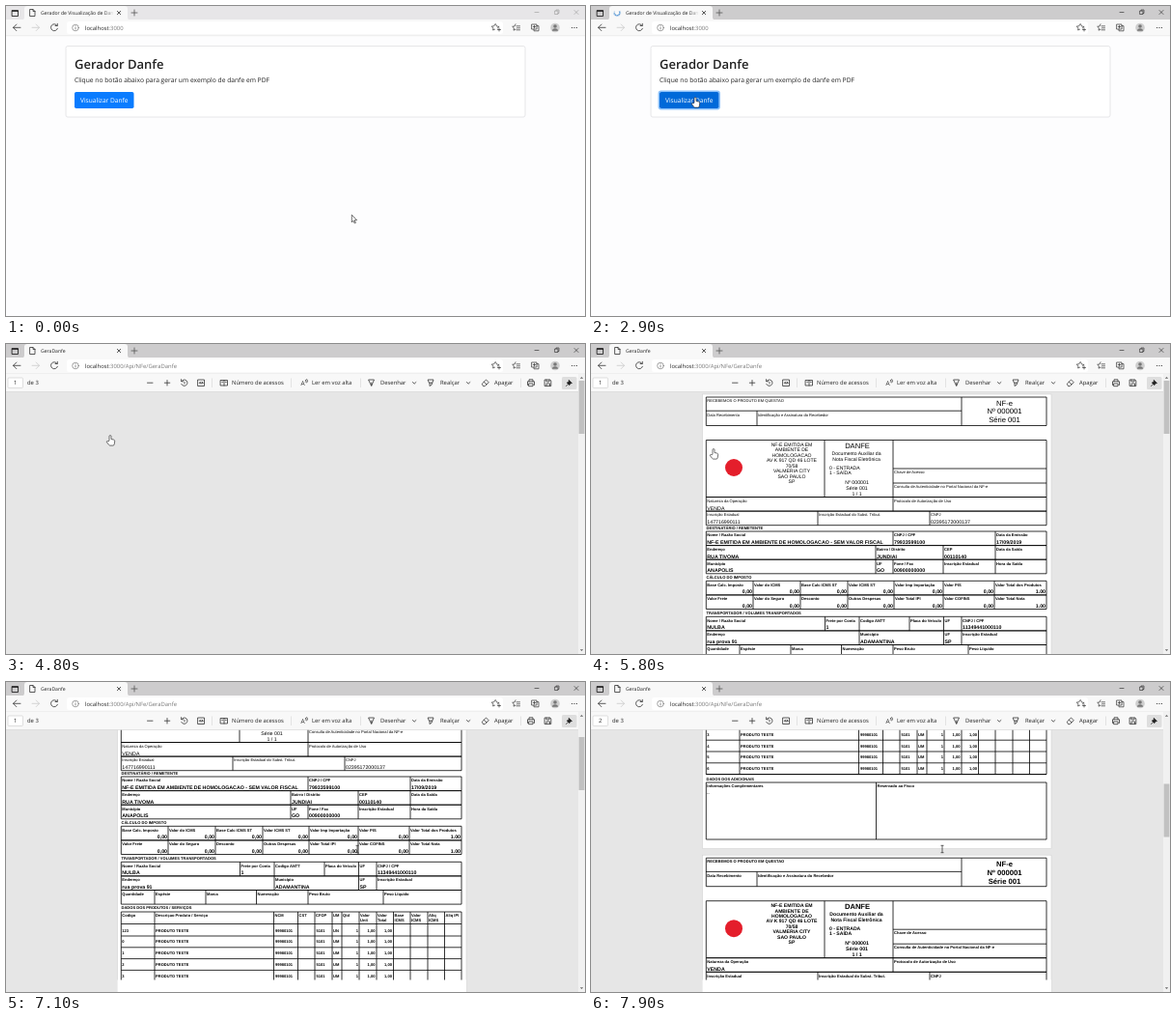
Write an HTML page that moves like this. It is 600x321 px and loops after 8 s.

```html
<!DOCTYPE html>
<html lang="pt-BR">
<head>
<meta charset="utf-8">
<title>Gerador de Danfe</title>
<style>
html, body { margin: 0; height: 100%; overflow: hidden; background: #fdfdfe; }
svg { display: block; width: 100vw; height: 100vh; text-rendering: geometricPrecision; }
.ui { font-family: "Open Sans", "Noto Sans", sans-serif; fill: #222; }
.doc { font-family: "Liberation Sans", Arial, sans-serif; fill: #000; }
.tab { font-size: 5.1px; }
.bar { font-size: 5.87px; }
.ico { fill: none; stroke: #333; stroke-width: .8; stroke-linecap: round; stroke-linejoin: round; }
.rule { fill: none; stroke: #000; stroke-width: .8; }
.mute { fill: #777; }

.a { animation: 8s step-end infinite; }
.frame { animation-name: frame; }
.winbtn { animation-name: winbtn; }
.page { animation-name: page; }
.viewer { animation-name: viewer; }
.loaded { animation-name: loaded; }
.sheets { animation-name: sheets; }
.title1 { animation-name: title1; }
.title2 { animation-name: title2; }
.path { animation-name: path; }
.fileicon { animation-name: fileicon; }
.spin { animation-name: spin; }
.wheel { animation: wheel 1s steps(10) infinite; transform-origin: 27px 7px; }
.button { animation-name: button; }
.ring { animation-name: ring; }
.pg1 { animation-name: pg1; }
.pg2 { animation-name: pg2; }
.edge { animation-name: edge; }
.scroll { animation-name: scroll; }
.thumb { animation-name: thumb; }
.cursor { animation-name: cursor; }
.arrow { animation-name: arrow; }
.hand { animation-name: hand; }
.beam { animation-name: beam; }

@keyframes frame { 0% { fill: #e7e6e8 } 32.5%, 100% { fill: #cdcccd } }
@keyframes winbtn { 0% { stroke: #999 } 32.5%, 100% { stroke: #222 } }
@keyframes page { 0% { visibility: visible } 56.25%, 100% { visibility: hidden } }
@keyframes viewer { 0% { visibility: hidden } 56.25%, 100% { visibility: visible } }
@keyframes loaded { 0% { visibility: hidden } 60%, 100% { visibility: visible } }
@keyframes sheets { 0% { visibility: hidden } 62.5%, 100% { visibility: visible } }
@keyframes title1 { 0% { visibility: visible } 43.75%, 100% { visibility: hidden } }
@keyframes title2 { 0% { visibility: hidden } 43.75% { visibility: visible } 60%, 100% { visibility: hidden } }
@keyframes path { 0% { visibility: hidden } 43.75%, 100% { visibility: visible } }
@keyframes fileicon { 0% { visibility: visible } 32.5% { visibility: hidden } 50%, 100% { visibility: visible } }
@keyframes spin { 0% { visibility: hidden } 32.5% { visibility: visible } 50%, 100% { visibility: hidden } }
@keyframes wheel { to { transform: rotate(360deg) } }
@keyframes button { 0% { fill: #0a7cff } 16.25% { fill: #0572ec } 17.5%, 100% { fill: #0069d9 } }
@keyframes ring { 0% { visibility: hidden } 32.5%, 100% { visibility: visible } }
@keyframes pg1 { 0% { visibility: hidden } 60% { visibility: visible } 97.5%, 100% { visibility: hidden } }
@keyframes pg2 { 0% { visibility: hidden } 97.5%, 100% { visibility: visible } }
@keyframes edge { 0% { visibility: hidden } 86.25%, 100% { visibility: visible } }
@keyframes scroll {
  0% { transform: translateY(0) }
  85% { transform: translateY(0); animation-timing-function: steps(3) }
  88.75% { transform: translateY(-96px); animation-timing-function: steps(4) }
  93.75% { transform: translateY(-256px); animation-timing-function: steps(4) }
  98.75%, 100% { transform: translateY(-346px) }
}
@keyframes thumb {
  0% { transform: translateY(0) }
  85% { transform: translateY(0); animation-timing-function: steps(3) }
  88.75% { transform: translateY(19px); animation-timing-function: steps(4) }
  93.75% { transform: translateY(50px); animation-timing-function: steps(4) }
  98.75%, 100% { transform: translateY(67.5px) }
}
@keyframes cursor {
  0% { transform: translate(358px, 216px); animation-timing-function: steps(4) }
  5% { transform: translate(151px, 93px) }
  6.25% { transform: translate(151px, 93px); animation-timing-function: steps(5) }
  12.5% { transform: translate(182px, 101px); animation-timing-function: steps(4) }
  17.5% { transform: translate(112px, 96px); animation-timing-function: steps(5) }
  23.75% { transform: translate(109px, 95px); animation-timing-function: steps(3) }
  27.5% { transform: translate(108px, 95px) }
  72.5% { transform: translate(127px, 109px); animation-timing-function: steps(3) }
  76.25% { transform: translate(300px, 63px); animation-timing-function: steps(2) }
  78.75% { transform: translate(458px, 190px); animation-timing-function: steps(2) }
  81.25% { transform: translate(400px, 311px) }
  82.5%, 100% { transform: translate(364px, 173px) }
}
@keyframes arrow { 0% { visibility: visible } 16.25%, 100% { visibility: hidden } }
@keyframes hand { 0% { visibility: hidden } 16.25% { visibility: visible } 73.75%, 100% { visibility: hidden } }
@keyframes beam { 0% { visibility: hidden } 73.75%, 100% { visibility: visible } }
</style>
</head>
<body>
<svg viewBox="0 0 600 321">
  <defs>
    <linearGradient id="fade"><stop stop-color="#f8f8f8" stop-opacity="0"/><stop offset="1" stop-color="#f8f8f8"/></linearGradient>
    <clipPath id="tabclip"><path d="M19 0H112V14H19z"/></clipPath>
  </defs>
  <rect width="600" height="321" fill="#fdfdfe"/>

  <g class="ui a page">
    <rect x="62" y="41.5" width="476" height="73.5" rx="2" fill="#fff" stroke="#e0e0e2" stroke-width=".8"/>
    <text x="71" y="65" font-size="13.04" font-weight="600">Gerador Danfe</text>
    <text x="71" y="79.3" font-size="6.71">Clique no botão abaixo para gerar um exemplo de danfe em PDF</text>
    <rect class="a ring" x="70.3" y="88.3" width="62.9" height="18.4" rx="2.4" fill="none" stroke="#8cc2fb" stroke-width="1.5"/>
    <rect class="a button" x="71" y="89" width="61.5" height="17" rx="1.8"/>
    <text x="77" y="100" font-size="6.61" fill="#fff">Visualizar Danfe</text>
  </g>

  <g class="a viewer">
    <rect y="31" width="600" height="290" fill="#e6e6e6"/>
    <g class="a sheets"><g class="doc a scroll" id="doc"></g></g>
    <rect class="a edge" x="115.5" y="308.5" width="361.5" height="13" fill="#fff"/>
  </g>

  <g class="ui">
    <rect class="a frame" width="600" height="14.5"/>
    <path d="M16 14.5q3 0 3-3V3q0-3 3-3H123q3 0 3 3V11.500q0 3 3 3z" fill="#f8f8f8"/>
    <rect y="14" width="600" height="17" fill="#f8f8f8"/>
    <path d="M0 30.800H600" stroke="#e2e2e2" stroke-width=".6"/>
    <rect x="63" y="16" width="452" height="13" rx="2.500" fill="#fff"/>
    <g class="ico">
      <path d="M6.500 4.500h6v6h-6zM6.500 5.500h6" stroke="#111"/>
      <path d="M7.500 22.300H15M10.800 19l-3.300 3.300 3.300 3.300"/>
      <path d="M27 22.300h7.500M31.200 19l3.300 3.300-3.300 3.300" stroke="#ccc"/>
      <path d="M53 20.300a3.500 3.500 0 1 0 .4 3M53.300 18.300v2.200h-2.200"/>
      <circle cx="72" cy="22.500" r="3.300" stroke="#666" stroke-width=".6"/>
      <path d="M72 22.300v1.700M72 20.800v.1" stroke="#666" stroke-width=".7"/>
      <path d="M115.300 5.300l3.400 3.400M118.700 5.300l-3.400 3.400"/>
      <path d="M130 7h6M133 4v6" stroke="#555"/>
      <path d="M507.500 18.800l1.100 2.300 2.500.3-1.900 1.700M506.500 24.200l-1.900.8.400-2.200-1.800-1.700 2.500-.3 1.100-2M509.500 24.500h3M511 23v3" stroke-width=".7"/>
      <path d="M528 18.800l-1 2.200-2.300.3 1.700 1.600-.4 2.300 2-1.100M529 20.800h3.500M529.500 22.800h3M529 24.800h3.500" stroke-width=".7"/>
      <path d="M545 19h5v5h-5zM547 24v1.800h5v-5.200h-2M547.500 20.200v2.600M546.200 21.500h2.600" stroke-width=".7"/>
      <g class="a winbtn" stroke-width=".6"><path d="M548 6.500h4M569 5h3v3.500h-3zM570 5V4h3v3.500h-1M589 4.500l4 4M593 4.500l-4 4"/></g>
    </g>
    <circle cx="569" cy="22.500" r="4.800" fill="#cfcfcf"/>
    <circle cx="569" cy="21" r="1.800" fill="#777"/><path d="M566 25.800q0-2.500 3-2.500t3 2.500z" fill="#777"/>
    <path d="M586.600 22.500h.01M589 22.500h.01M591.400 22.500h.01" stroke="#222" stroke-width="1.200" stroke-linecap="round"/>
    <path class="ico a fileicon" d="M25 3.500h3l2 2v5h-5zM28 3.500v2h2" stroke-width=".7"/>
    <g class="a spin"><circle class="wheel" cx="27" cy="7" r="3" fill="none" stroke="#1a73c8" stroke-width=".9" stroke-dasharray="12 7"/></g>
    <g class="tab" clip-path="url(#tabclip)">
      <text class="a title1" x="36" y="8.900">Gerador de Visualização de Danfe</text>
      <text class="a title2" x="36" y="8.900">localhost:3000/Api/NFe/GeraDanfe</text>
      <text class="a loaded" x="36" y="8.900">GeraDanfe</text>
      <rect x="102" y="2" width="10" height="10" fill="url(#fade)"/>
    </g>
    <text class="bar" x="82" y="24.500">localhost<tspan class="mute">:3000</tspan><tspan class="mute a path">/Api/NFe/GeraDanfe</tspan></text>
  </g>

  <g class="ui bar a loaded">
    <rect y="31" width="593" height="18.500" fill="#f8f8f8"/>
    <path d="M0 49.500H593" stroke="#d4d4d4" stroke-width=".6"/>
    <rect x="2" y="35" width="15.500" height="10.500" rx="1" fill="#fff" stroke="#ccc" stroke-width=".6"/>
    <text class="a pg1" x="8" y="42.200">1</text>
    <text class="a pg2" x="8" y="42.200">2</text>
    <text x="22" y="42.200">de 3</text>
    <text x="234" y="42.200">Número de acessos</text>
    <text x="317" y="42.200">Ler em voz alta</text>
    <text x="388" y="42.200">Desenhar</text>
    <text x="450" y="42.200">Realçar</text>
    <text x="506" y="42.200">Apagar</text>
    <text x="305.500" y="42.500" font-size="6.500">A</text>
    <path d="M213.500 35.500v9.500M295.500 35.500v9.500M367.500 35.500v9.500M533.500 35.500v9.500" stroke="#d5d5d5" stroke-width=".6"/>
    <rect x="576" y="34" width="15.500" height="13" rx="1.500" fill="#dedede"/>
    <g class="ico" stroke-width=".7">
      <path d="M146.500 40.200h5.500M164.300 40.200h5.500M167 37.500v5.500"/>
      <path d="M182 38.500a3.200 3.200 0 1 1-.2 3M181.600 36.600v2.200h2.200M185 39.500v1.500"/>
      <path d="M199 37h6.500v6.500h-6.500zM200.800 40.200h3M201.500 39.200l-1 1 1 1M203.200 39.200l1 1-1 1"/>
      <path d="M222.500 37.500h7v5.500h-7zM226 37.500v5.500M223.800 39.300h1M227.300 39.300h1"/>
      <path d="M310.500 37.300q1 1 0 2M311.800 36.500q1.700 1.800 0 3.500"/>
      <path d="M376 37h5.500l-2.700 6zM378.800 40v3"/>
      <path d="M421.500 39.500l1.700 1.700 1.700-1.700M477.500 39.500l1.700 1.700 1.700-1.700"/>
      <path d="M437.500 37h5.500l-1.200 3.200h-3zM439 40.200v3.300l2.300-1.500v-1.800"/>
      <path d="M493.500 41l4-4 2.700 2.700-4 4h-1.300zM495.300 39.200l2.700 2.700"/>
      <path d="M542 38.800v-2h4v2M541 42.500h-.5v-3.700h7v3.700h-.5M542 41h4v2.700h-4z"/>
      <path d="M558.500 37h5.300l1 1v5.500h-6.300zM560 37v2h3v-2M560 43.500v-2.500h3.500v2.500"/>
      <path d="M583.500 37.500l3 3-1.500.4-1.300 1.800-2.500-2.500 1.800-1.200zM582 42l-1.500 1.500" fill="#222"/>
    </g>
  </g>
  <g class="a viewer">
    <rect x="593" y="31" width="7" height="290" fill="#f1f1f1"/>
    <path d="M594.800 35.700l1.700-1.800 1.700 1.800zM594.800 316.300l1.700 1.800 1.700-1.800z" fill="#666"/>
    <rect class="a thumb" x="593.600" y="38" width="5.800" height="55" fill="#c1c1c1"/>
  </g>

  <g class="a cursor">
    <path class="a arrow" d="M.3.3V8L2 6.300 3.200 9 4.400 8.500 3.200 5.800H5.600z" fill="#fff" stroke="#111" stroke-width=".6"/>
    <path class="a hand" d="M-1 5V.6q0-1 1-1t1 1V3.500l2.600.6q1.200.4 1.100 1.600l-.5 3.200q-.2 1.200-1.400 1.200H0q-1 0-1.600-.9L-3.600 6.600q-.3-.9.5-1.100.7-.1 1.200.6z" fill="#fff" stroke="#111" stroke-width=".6"/>
    <path class="a beam" d="M-1.500-3.700H1.500M0-3.700V3.700M-1.500 3.700H1.500" fill="none" stroke="#222" stroke-width=".7"/>
  </g>
</svg>
<script>
const LEFT = 119.3, RIGHT = 472;
const doc = document.getElementById('doc');

function add(parent, tag, attrs, content) {
  const node = document.createElementNS('http://www.w3.org/2000/svg', tag);
  for (const key in attrs) node.setAttribute(key, attrs[key]);
  if (content) node.textContent = content;
  return parent.appendChild(node);
}
// y is the middle of the line of text
function write(g, x, y, content, size = 4.07, weight = 700, anchor = 'start') {
  add(g, 'text', { x, y: y + size * .36, 'font-size': size, 'font-weight': weight, 'text-anchor': anchor }, content);
}
const rule = (g, d) => add(g, 'path', { d, class: 'rule' });
const box = (g, top, bottom) => rule(g, `M${LEFT} ${top}H${RIGHT}V${bottom}H${LEFT}z`);

// Each cell is [left edge, label, value]
function row(g, top, height, cells, weight = 700, right = false) {
  box(g, top, top + height);
  cells.forEach(([x, label, value], i) => {
    if (i) rule(g, `M${x} ${top}v${height}`);
    write(g, x + 1, top + 3.9, label, 4.07, weight);
    if (!value) return;
    const end = (cells[i + 1] || [RIGHT])[0] - 1;
    write(g, right ? end : x + 1, top + 11.3, value, 5.25, weight, right ? 'end' : 'start');
  });
}

function header(g, weight) {
  const center = (x, y, content, size) => write(g, x, y, content, size, weight, 'middle');
  const label = (x, y, content, size) => write(g, x, y, content, size, weight);
  box(g, 55, 84.5);
  rule(g, 'M384 55V84.5M119 69.200H384M172 69.200V84.500');
  label(120.3, 58.2, 'RECEBEMOS O PRODUTO EM QUESTAO');
  label(120.3, 73.2, 'Data Recebimento');
  label(173, 73.2, 'Identificação e Assinatura do Recebedor');
  ['NF-e', 'Nº 000001', 'Série 001'].forEach((s, i) => center(428.5, 60.8 + i * 8.9, s, 7.65));

  box(g, 99.5, 158.5);
  rule(g, 'M242 99.500V158.500M313 99.500V158.500M313 129H472M313 144H472');
  add(g, 'circle', { cx: 148, cy: 128, r: 9, fill: '#e41e2b' });
  ['NF-E EMITIDA EM', 'AMBIENTE DE', 'HOMOLOGACAO', 'AV K 917 QD 46 LOTE', '70/58', 'VALMERIA CITY', 'SAO PAULO', 'SP']
    .forEach((s, i) => center(208, 104.2 + i * 5.42, s, 5.1));
  center(276, 105.2, 'DANFE', 7.6);
  center(275, 113.2, 'Documento Auxiliar da', 5.1);
  center(275, 118.8, 'Nota Fiscal Eletrônica', 5.1);
  label(247, 127.8, '0 - ENTRADA', 5.1);
  label(247, 133.4, '1 - SAÍDA', 5.1);
  ['Nº 000001', 'Série 001', '1 / 1'].forEach((s, i) => center(275.5, 143 + i * 5.9, s, 5.25));
  label(314, 132.5, 'Chave de Acesso');
  label(314, 147.3, 'Consulta de Autenticidade no Portal Nacional da NF-e');
  row(g, 158.5, 14.6, [[LEFT, 'Natureza da Operação', 'VENDA'], [313, 'Protocolo de Autorização de Uso']], weight);
  row(g, 173.1, 14.6, [[LEFT, 'Inscrição Estadual', '147716990111'],
    [235, 'Inscrição Estadual do Subst. Tribut.'], [351, 'CNPJ', '02395172000137']], weight);
}

function details(g) {
  const H = 14.6;
  write(g, 119.5, 190.3, 'DESTINATÁRIO / REMETENTE');
  row(g, 194, H, [[LEFT, 'Nome / Razão Social', 'NF-E EMITIDA EM AMBIENTE DE HOMOLOGACAO - SEM VALOR FISCAL'],
    [313, 'CNPJ / CPF', '79933599100'], [419, 'Data da Emissão', '17/09/2019']]);
  row(g, 194 + H, H, [[LEFT, 'Endereço', 'RUA TIVOMA'], [295, 'Bairro / Distrito', 'JUNDIAI'],
    [365, 'CEP', '00110140'], [419, 'Data da Saída']]);
  row(g, 194 + 2 * H, H, [[LEFT, 'Município', 'ANAPOLIS'], [295, 'UF', 'GO'], [313, 'Fone / Fax', '00900000000'],
    [365, 'Inscrição Estadual'], [419, 'Hora da Saída']]);

  write(g, 119.5, 242, 'CÁLCULO DO IMPOSTO');
  const taxes = (top, names, total) => {
    const edges = [LEFT, 168, 217, 266, 314, 365, 418];
    row(g, top, H, names.map((s, i) => [edges[i], s, i < 6 ? '0,00' : total]), 700, true);
  };
  taxes(245.3, ['Base Calc. Imposto', 'Valor do ICMS', 'Base Calc ICMS ST', 'Valor ICMS ST', 'Valor Imp Importação', 'Valor PIS', 'Valor Total dos Produtos'], '1.00');
  taxes(245.3 + H, ['Valor Frete', 'Valor do Seguro', 'Desconto', 'Outras Despesas', 'Valor Total IPI', 'Valor COFINS', 'Valor Total Nota'], '1.00');

  write(g, 119.5, 278.8, 'TRANSPORTADOR / VOLUMES TRANSPORTADOS');
  row(g, 282.3, H, [[LEFT, 'Nome / Razão Social', 'NULBA'], [242.5, 'Frete por Conta', '1'], [278, 'Codigo ANTT'],
    [330, 'Placa do Veículo'], [365.5, 'UF'], [384, 'CNPJ / CPF', '11349441000110']]);
  row(g, 282.3 + H, H, [[LEFT, 'Endereço', 'rua prova 91'], [278, 'Município', 'ADAMANTINA'], [365.5, 'UF', 'SP'],
    [384, 'Inscrição Estadual']]);
  row(g, 282.3 + 2 * H, H, [[LEFT, 'Quantidade'], [154, 'Espécie'], [207, 'Marca'], [259.5, 'Numeração'],
    [313, 'Peso Bruto'], [391, 'Peso Líquido']]);
}

function products(g) {
  write(g, 119.5, 330, 'DADOS DOS PRODUTOS / SERVIÇOS');
  const top = 334, first = 346.5, step = 11.8, count = 8, end = 359 + step * (count - 1);
  const heads = [[LEFT, 'Codigo'], [154, 'Descriçao Produto / Serviço'], [277.5, 'NCM'], [302.5, 'CST'], [320, 'CFOP'],
    [338, 'UM'], [348, 'Qtd'], [366, 'Valor', 'Unit'], [384, 'Valor', 'Total'], [401.5, 'Base', 'ICMS'],
    [419, 'Valor', 'ICMS'], [437, 'Aliq', 'ICMS'], [454.5, 'Aliq IPI']];
  box(g, top, end);
  rule(g, `M${LEFT} ${first}H${RIGHT}`);
  heads.forEach(([x, a, b], i) => {
    if (i) rule(g, `M${x} ${top}V${end}`);
    write(g, x + 1, 338, a);
    if (b) write(g, x + 1, 342.8, b);
  });
  for (let i = 0; i < count; i++) {
    const line = 359 + i * step, y = line - 5.8;
    rule(g, `M${LEFT} ${line}H${RIGHT}`);
    [[120.3, i ? i - 1 : '123'], [155, 'PRODUTO TESTE'], [279, '99980101'], [321.5, '5101'], [339, i ? 'UM' : 'UN']]
      .forEach(([x, s]) => write(g, x, y, String(s)));
    [[365, '1'], [382.5, '1,00'], [400, '1,00']].forEach(([x, s]) => write(g, x, y, s, 4.07, 700, 'end'));
  }
  write(g, 119.5, 446.2, 'DADOS DOS ADICIONAIS');
  row(g, 450, 59, [[LEFT, 'Informações Complementares'], [295.5, 'Reservado ao Fisco']]);
  write(g, 120.3, 461, '..');
}

function sheet(y) {
  const g = add(doc, 'g', { transform: `translate(0 ${y})` });
  add(g, 'rect', { x: 115.5, y: 52, width: 361.5, height: 466.5, fill: '#fff', stroke: '#d2d2d2', 'stroke-width': .6 });
  return g;
}

const front = sheet(0);
header(front, 400);
details(front);
products(front);
header(sheet(473.2), 700);
</script>
</body>
</html>
```
